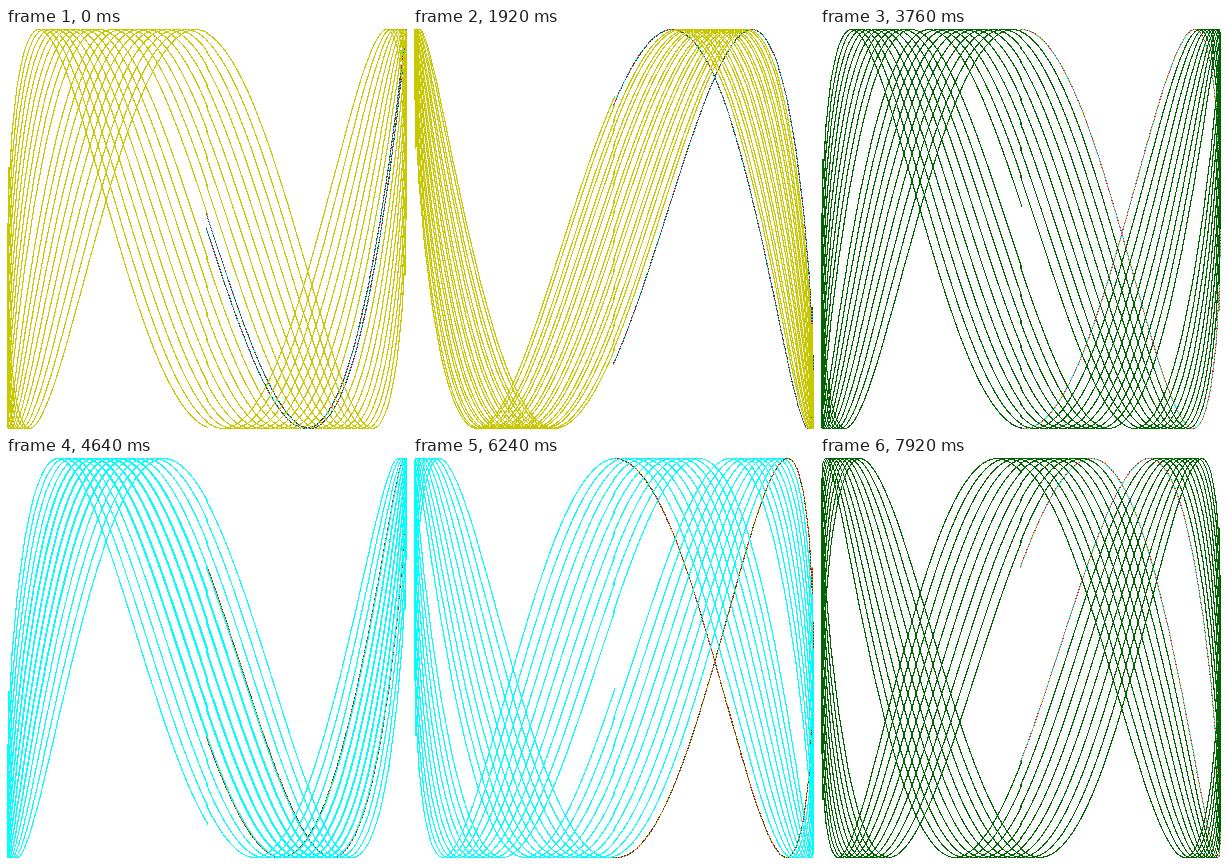
Write an HTML page without scripts that moves like this. It is 401 px wide and 401 px high and loops after 8000 ms.

```html
<!DOCTYPE html>
<html lang="en">
<head>
<meta charset="utf-8">
<title>Lissajous curve</title>
<style>
@property --n { syntax: "<number>"; inherits: true; initial-value: 0; }

:root { --yellow: #c8c800; --green: #006400; --cyan: #0ff; --pink: #ff0066; }
html, body { margin: 0; width: 100%; height: 100%; overflow: hidden; background: #fff; }

.stage {
  display: block; width: 401px; height: 401px;
  fill: none; stroke: currentColor; stroke-width: 1.15;
  shape-rendering: crispEdges;
  animation: phase 8s steps(100) infinite, ink .8s step-end infinite;
}
@keyframes phase { from { --n: 0; } to { --n: 100; } }
@keyframes ink {
  0%, 40% { color: var(--yellow); --u: var(--green); --v: var(--pink); --w: var(--cyan); }
  10%, 60% { color: var(--pink); --u: var(--yellow); --v: var(--cyan); --w: var(--green); }
  20%, 50%, 70%, 90%, 100% { color: var(--green); --u: var(--cyan); --v: var(--pink); --w: var(--yellow); }
  30%, 80% { color: var(--cyan); --u: var(--green); --v: var(--pink); --w: var(--yellow); }
}

/* x = sin t is cut into 6 degree strips; inside each one a sine wave scrolls.
   --i is the strip, --x its left edge, --k the half lap */
.f, .b {
  --sin: sin(calc(var(--i) * 6deg));
  --left: calc(200.5px + 200px * var(--sin) - var(--x) * 1px);
  --zoom: calc((sin(calc(var(--i) * 6deg + 6deg)) - var(--sin)) * 200 / 18.139809);
  --psi: calc(var(--n) * 5.729578 + var(--k) * 4.194259);
  d: path("M-90-199.5c65.56 0 114.44 399 180 399s114.44-399 180-399 114.44 399 180 399 114.44-399 180-399 114.44 399 180 399 114.44-399 180-399 114.44 399 180 399 114.44-399 180-399");
  vector-effect: non-scaling-stroke;
}
.f {
  transform: translate(var(--left), 201px) scaleX(var(--zoom))
    translateX(calc(-1px * (var(--i) * 18.139809 + var(--psi))));
}
.b {
  transform: translate(var(--left), 201px) scaleX(calc(-1 * var(--zoom)))
    translateX(calc(-1px * (544.194259 - var(--i) * 18.139809 + var(--psi))));
}

.laps use:nth-child(odd) { transform: rotate(180deg); transform-origin: 201px 201px; }
.first { --k: 0; }
.first use:nth-child(1) { stroke: var(--u); }
.first use:nth-child(2) { stroke: var(--v); stroke-dasharray: 1 2; }
.first use:nth-child(3) { stroke: var(--w); stroke-dasharray: 1 2; stroke-dashoffset: 1; }
</style>
</head>
<body>
<svg class="stage" viewBox="0 0 401 401">
  <defs>
    <g id="half">
      <svg x="200" width="21" height="401" style="--i:0;--x:200"><path class="f"/><path class="b"/></svg>
      <svg x="221" width="21" height="401" style="--i:1;--x:221"><path class="f"/><path class="b"/></svg>
      <svg x="242" width="20" height="401" style="--i:2;--x:242"><path class="f"/><path class="b"/></svg>
      <svg x="262" width="20" height="401" style="--i:3;--x:262"><path class="f"/><path class="b"/></svg>
      <svg x="282" width="18" height="401" style="--i:4;--x:282"><path class="f"/><path class="b"/></svg>
      <svg x="300" width="18" height="401" style="--i:5;--x:300"><path class="f"/><path class="b"/></svg>
      <svg x="318" width="16" height="401" style="--i:6;--x:318"><path class="f"/><path class="b"/></svg>
      <svg x="334" width="15" height="401" style="--i:7;--x:334"><path class="f"/><path class="b"/></svg>
      <svg x="349" width="13" height="401" style="--i:8;--x:349"><path class="f"/><path class="b"/></svg>
      <svg x="362" width="12" height="401" style="--i:9;--x:362"><path class="f"/><path class="b"/></svg>
      <svg x="374" width="9" height="401" style="--i:10;--x:374"><path class="f"/><path class="b"/></svg>
      <svg x="383" width="8" height="401" style="--i:11;--x:383"><path class="f"/><path class="b"/></svg>
      <svg x="391" width="5" height="401" style="--i:12;--x:391"><path class="f"/><path class="b"/></svg>
      <svg x="396" width="3" height="401" style="--i:13;--x:396"><path class="f"/><path class="b"/></svg>
      <svg x="399" width="2" height="401" style="--i:14;--x:399"><path class="f"/><path class="b"/></svg>
    </g>
  </defs>
  <g class="first">
    <use href="#half"/>
    <use href="#half"/>
    <use href="#half"/>
  </g>
  <g class="laps">
    <use href="#half" style="--k:1"/>
    <use href="#half" style="--k:2"/>
    <use href="#half" style="--k:3"/>
    <use href="#half" style="--k:4"/>
    <use href="#half" style="--k:5"/>
    <use href="#half" style="--k:6"/>
    <use href="#half" style="--k:7"/>
    <use href="#half" style="--k:8"/>
    <use href="#half" style="--k:9"/>
    <use href="#half" style="--k:10"/>
    <use href="#half" style="--k:11"/>
    <use href="#half" style="--k:12"/>
    <use href="#half" style="--k:13"/>
    <use href="#half" style="--k:14"/>
    <use href="#half" style="--k:15"/>
    <use href="#half" style="--k:16"/>
    <use href="#half" style="--k:17"/>
    <use href="#half" style="--k:18"/>
    <use href="#half" style="--k:19"/>
  </g>
</svg>
</body>
</html>
```
